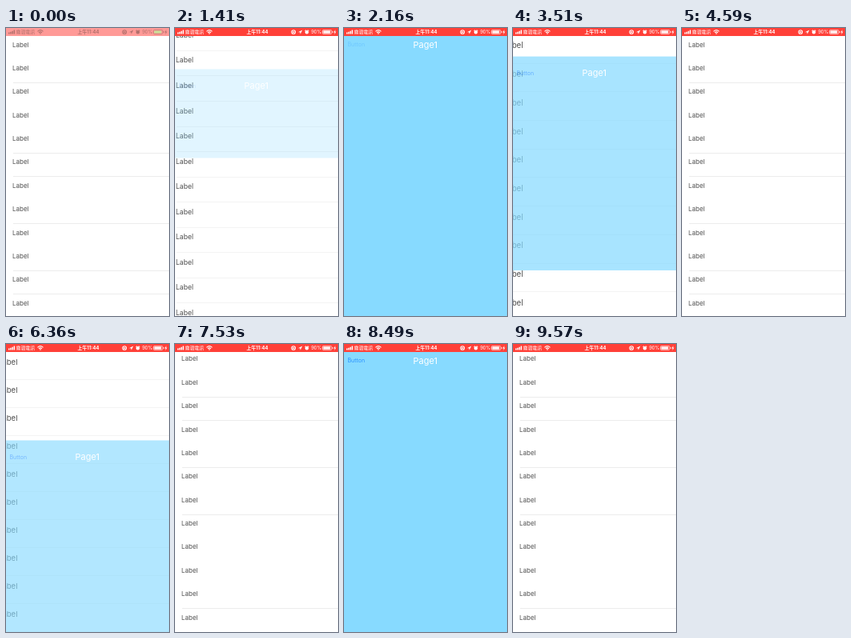
Recreate the animation shown at these times as an HTML page. Size 204 by 360 pixels, loop 9960 ms.

```html
<!DOCTYPE html>
<html lang="zh-Hant">
<head>
<meta charset="utf-8">
<title>Expanding list cell</title>
<style>
  html, body { margin: 0; width: 204px; height: 360px; overflow: hidden; background: #fff; }
  svg { display: block; }
  text { font-family: Inter, "Noto Sans CJK TC", "Noto Sans CJK", "Noto Sans CJK SC", sans-serif; }
  #labels text { font-size: 8px; fill: #4e4e4e; }
  #lines rect { fill: #ececec; shape-rendering: crispEdges; }
  #icons text { font-size: 5.9px; }
</style>
</head>
<body>
<svg width="204" height="360" viewBox="0 0 204 360">
  <g id="lines"></g>
  <g id="labels"></g>
  <rect id="thumb" x="201" width="2" height="119" rx="1" fill="#000"/>
  <g id="card">
    <rect id="panel" width="204" fill="#87daff"/>
    <g id="content">
      <text id="button" x="4.5" y="23.2" font-size="7" fill="#1a86ff">Button</text>
      <text x="101.7" y="24.8" font-size="11" fill="#fff" text-anchor="middle">Page1</text>
    </g>
  </g>
  <rect id="bar" width="204" height="10"/>
  <g id="icons">
    <path d="M3 5.6h1.5v1.9H3zM5.2 4.7h1.5v2.8H5.2zM7.4 3.7h1.5v3.8H7.4zM9.6 2.6h1.5v4.9H9.6z"/>
    <text x="12.6" y="7.3">霧嶺電訊</text>
    <g fill="none" stroke="currentColor" stroke-width="1.1">
      <path d="M39.5 4.3Q43 1 46.5 4.3M41 5.8Q43 3.9 45 5.8"/>
      <circle cx="148.3" cy="5" r="2.3"/>
    </g>
    <path d="M41.9 6.7Q43 5.9 44.1 6.7L43 7.9zM147.4 4.2h1.8v1.8h-1.8z"/>
    <text x="103" y="7.2" font-weight="700" text-anchor="middle">上午11:44</text>
    <path d="M154 5.2L159.4 2.4 156.8 7.8 156.5 5.3z"/>
    <circle cx="165" cy="5.2" r="2.2"/>
    <path d="M162.3 3.6l1.4-1.4.7.6-1.6 1.4zM167.7 3.6l-1.4-1.4-.7.6 1.6 1.4z"/>
    <text x="170.2" y="7.2">90%</text>
    <rect x="184.5" y="2.5" width="11.6" height="5" rx="1.2" fill="none" stroke="currentColor" stroke-width=".6"/>
    <path id="charge" d="M185.4 3.4h9v3.2h-9z"/>
    <path d="M196.7 4.1h.8v1.8h-.8z"/>
    <path d="M200.6 2L198.5 5.4h1.4l-.5 2.8 2.2-3.6h-1.4z"/>
  </g>
</svg>
<script>
const LOOP = 9960, STEP = 30, W = 204, H = 360;
const PITCH = 29.376, TOP = 9.5, ROWS = 15, ZOOM = 0.3;
const SCROLL = { from: 4935, to: 5910, dist: 501.4, max: 679 };

// Each visit: tapped row, opening, button press, closing (ms)
const visits = [
  { row: 2,  open: [1305, 1610], press: 2160, close: [2205, 2490] },
  { row: 4,  open: [3320, 3620], press: 4080, close: [4330, 4590] },
  { row: 11, open: [6186, 6486], press: 7170, close: [7270, 7530] },
  { row: 7,  open: [8165, 8480], press: 9000, close: [9285, 9570] }
];
// Hairlines that survive at rest, before and after scrolling
const restLines = [[2, 5, 6, 8, 10, 11], [2, 3, 5, 7, 11]];

const $ = id => document.getElementById(id);
const set = (el, attrs) => { for (const k in attrs) el.setAttribute(k, attrs[k]); };
const add = (parent, tag, attrs) => {
  const el = document.createElementNS("http://www.w3.org/2000/svg", tag);
  set(el, attrs);
  return parent.appendChild(el);
};
const clamp = v => Math.max(0, Math.min(1, v));
const mix = (a, b, p) => a + (b - a) * p;
const blend = (a, b, p) => `rgb(${a.map((v, i) => Math.round(mix(v, b[i], p)))})`;
const span = (t, [a, b]) => clamp((t - a) / (b - a));

function bezier(x1, y1, x2, y2) {
  const at = (a, b, s) => 3 * a * s * (1 - s) ** 2 + 3 * b * s * s * (1 - s) + s ** 3;
  return x => {
    if (x <= 0 || x >= 1) return clamp(x);
    let lo = 0, hi = 1;
    for (let i = 0; i < 24; i++) {
      const mid = (lo + hi) / 2;
      if (at(x1, x2, mid) < x) lo = mid; else hi = mid;
    }
    return at(y1, y2, (lo + hi) / 2);
  };
}
const easeInOut = bezier(0.42, 0, 0.58, 1);
const flick = bezier(0.25, 0.3, 0.4, 1);

const rows = Array.from({ length: ROWS }, (_, i) => {
  const label = add($("labels"), "text", { x: 8, y: i * PITCH + 14 });
  label.textContent = "Label";
  return { label, line: add($("lines"), "rect", { height: 1, width: W }) };
});

function drawList(top, p, lines) {
  const scale = 1 + ZOOM * p;
  set($("labels"), {
    transform: `translate(102 180) scale(${scale}) translate(-102 ${top - 180})`
  });
  rows.forEach(({ line }, i) => set(line, {
    x: Math.max(0, 102 + (8.5 - 102) * scale),
    y: Math.floor(180 + (top + i * PITCH - 180) * scale),
    opacity: !lines ? 0.6 : lines.includes(i) ? 1 : 0
  }));
}

function drawCard(top, visit, p, pressed) {
  const start = top + visit.row * PITCH;
  const y = mix(start, 0, p), bottom = mix(start + PITCH, H, p);
  set($("card"), { opacity: p });
  set($("panel"), { y, height: bottom - y });
  set($("content"), { transform: `translate(0 ${y})` });
  set($("button"), { opacity: pressed ? 0.22 : 0.85 });
}

function drawBar(t) {
  const p = clamp(t / 120), white = [255, 255, 255];
  const ink = blend([178, 112, 108], white, p);
  set($("bar"), { fill: blend([255, 154, 151], [255, 64, 56], p) });
  set($("icons"), { fill: ink, color: ink });
  set($("charge"), { fill: blend([200, 222, 152], white, p) });
}

function draw(t) {
  const visit = visits.find(v => t < v.close[1]) || visits[3];
  const p = easeInOut(span(t, visit.open)) * (1 - easeInOut(span(t, visit.close)));
  const u = span(t, [SCROLL.from, SCROLL.to]);
  const offset = SCROLL.dist * flick(u);
  const moving = (u > 0 && u < 1) || (p > 0 && p < 1);
  const top = TOP - offset % PITCH;

  drawList(top, p, moving ? null : restLines[u < 1 ? 0 : 1]);
  drawCard(top, visit, p, t >= visit.press && t < visit.close[0]);
  drawBar(t);
  set($("thumb"), {
    y: 12 + 231 * offset / SCROLL.max,
    opacity: u > 0 && t < 5970 ? 0.3 : 0
  });
}

const t0 = performance.now();
function tick() {
  const t = (performance.now() - t0) % LOOP;
  draw(Math.floor(t / STEP) * STEP);
  requestAnimationFrame(tick);
}
tick();
</script>
</body>
</html>
```
